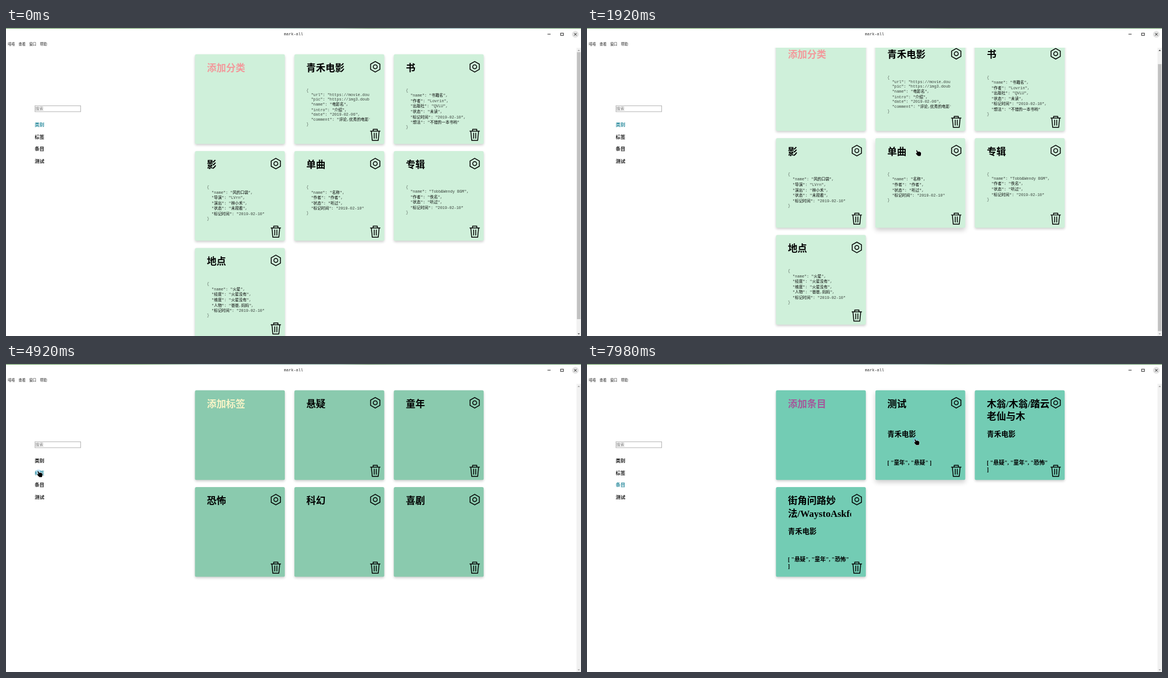
An HTML page for the animation above (8 s loop, 1021 by 548 pixels).

```html
<!DOCTYPE html>
<html lang="zh-CN">
<head>
<meta charset="utf-8">
<title>mark-all</title>
<style>
html, body { margin: 0; width: 100%; height: 100%; overflow: hidden; background: #fff; }
#pane { position: absolute; left: 0; top: 35.4px; width: 1012px; height: 512.6px; overflow: hidden; }
#page { position: absolute; left: 0; top: -35.4px; width: 1920px; height: 1200px; transform-origin: 0 0; }
.card { position: absolute; width: 300px; height: 300px; border-radius: 5px; }
.card > svg { position: absolute; left: 0; top: 0; }
#ui { position: absolute; left: 0; top: 0; }
text { font-family: "Liberation Serif", "Noto Sans CJK SC", "Noto Sans CJK", serif; }
.b { font-weight: bold; }
.m { font-family: "Liberation Mono", "Noto Sans CJK SC", "Noto Sans CJK", monospace; }
.s { font-family: "Noto Sans CJK SC", "Noto Sans CJK", sans-serif; }
</style>
</head>
<body>
<div id="pane"><div id="page"></div></div>
<svg id="ui" width="1021" height="548" viewBox="0 0 1021 548">
  <defs>
    <linearGradient id="sky">
      <stop offset="0" stop-color="#56914c"/><stop offset=".23" stop-color="#629a58"/>
      <stop offset=".34" stop-color="#8fada8"/><stop offset=".58" stop-color="#6f9788"/>
      <stop offset=".63" stop-color="#47784a"/><stop offset=".78" stop-color="#6a9498"/>
      <stop offset="1" stop-color="#568f50"/>
    </linearGradient>
  </defs>
  <rect width="1021" height="1" fill="url(#sky)"/>
  <g fill="none" stroke="#222">
    <path d="M961.5 11h5.5"/>
    <rect x="984.8" y="9.2" width="5" height="4"/>
    <circle cx="1011" cy="11.3" r="6" fill="#e3e3e3" stroke="none"/>
    <path d="M1008.8 9.1l4.4 4.4m0-4.4l-4.4 4.4"/>
  </g>
  <rect x="51.4" y="138.3" width="81.2" height="10.6" fill="#fff" stroke="#aaa" stroke-width=".9"/>
  <rect x="1013" y="35.4" width="8" height="513" fill="#f1f1f1"/>
  <rect id="thumb" x="1013.8" width="6.4" height="475" fill="#c1c1c1"/>
  <path id="up" d="M1014.9 41l2.1-2.4 2.1 2.4z"/>
  <path id="down" d="M1014.9 543.2l2.1 2.4 2.1-2.4z"/>
  <g id="labels"></g>
  <circle id="click" r="5" fill="#5bb8e8"/>
  <g id="cursor" stroke="#fff" stroke-width="1" stroke-linejoin="round">
    <path id="hand" paint-order="stroke" d="M-.5 0L1.5 3.3 3.1 2.8 4.700 3.200 6.300 3.900 7.200 5.600 7 8.400 6.100 10.800H1.900L-.5 8.400-2.100 6.200-1.100 5.200.3 5.800-1.500 1z"/>
    <path id="arrow" paint-order="stroke" d="M0 0V9.2L2 7.6 3.3 10.4 4.8 9.7 3.5 7 6 6.6z"/>
  </g>
</svg>
<script>
const K = 1021 / 1920, LOOP = 8000;
const NS = 'http://www.w3.org/2000/svg';
const $ = id => document.getElementById(id);

function add(parent, tag, attrs, text) {
  const el = document.createElementNS(NS, tag);
  for (const k in attrs) el.setAttribute(k, attrs[k]);
  if (text) el.textContent = text;
  parent.appendChild(el);
  return el;
}
const write = (parent, x, y, size, cls, str, fill = '#000') =>
  add(parent, 'text', { x, y, 'font-size': size, class: cls, fill }, str);

// Card content: title lines, then either record fields or an entry's category and tags.
const FILM = '青禾电影';
const views = [
  { color: '#cff0da', accent: '#f29a9c', cards: [
    { title: ['添加分类'] },
    { title: [FILM], code: 'url=https://movie.dou|pic=https://img3.doub|name=电影名|intro=介绍|date=2019-02-06|comment=评论,优秀的电影' },
    { title: ['书'], code: 'name=书籍名|作者=Lovrin|出版社=QVLU|状态=未读|标记时间=2019-02-10|想法=不错的一本书哟' },
    { title: ['影'], code: 'name=风的口袋|导演=LVrn|演出=林小禾|状态=未观看|标记时间=2019-02-10' },
    { title: ['单曲'], code: 'name=名称|作者=作者|状态=听过|标记时间=2019-02-10' },
    { title: ['专辑'], code: 'name=Tobb&Wendy BGM|作者=佚名|状态=听过|标记时间=2019-02-10' },
    { title: ['地点'], code: 'name=火星|经度=火星没有|维度=火星没有|人物=爸爸,妈妈|标记时间=2019-02-10' }
  ] },
  { color: '#8acaae', accent: '#faf5c8', cards:
    ['添加标签', '悬疑', '童年', '恐怖', '科幻', '喜剧'].map(s => ({ title: [s] })) },
  { color: '#73ccb4', accent: '#a4589a', cards: [
    { title: ['添加条目'] },
    { title: ['测试'], kind: FILM, tags: ['[ "童年", "悬疑" ]'] },
    { title: ['木翁/木翁/踏云', '老仙与木'], kind: FILM, tags: ['[ "悬疑", "童年", "恐怖"', ']'] },
    { title: ['街角问路妙', '法/WaystoAskfor'], kind: FILM, tags: ['[ "悬疑", "童年", "恐怖"', ']'] }
  ] }
];

const CJK = /[\u4e00-\u9fff]/;

function drawCode(box, code) {
  const rows = code.split('|').map((s, i, all) => {
    const [k, v] = s.split('=');
    return `"${k}": "${v}"${i < all.length - 1 ? ',' : ''}`;
  });
  let y = 124, descent = 0;
  ['{', ...rows, '}'].forEach((s, i) => {
    if (i) y += descent + (CJK.test(s) ? 14 : 11);
    descent = 4;
    const brace = s.length === 1;
    const line = write(box, brace ? 0 : 15.6, y, 13, 'm', '');
    // Thin Latin strokes look paler than the Chinese ones.
    s.split(/([\u4e00-\u9fff]+)/).filter(Boolean).forEach(part =>
      add(line, 'tspan', { fill: CJK.test(part) ? '#000' : '#000', 'fill-opacity': CJK.test(part) ? 1 : brace ? .55 : .72 }, part));
  });
}

function drawIcons(svg) {
  const g = add(svg, 'g', { fill: 'none', stroke: '#000', 'stroke-width': 2.8, 'stroke-linejoin': 'round', 'stroke-linecap': 'round' });
  add(g, 'path', { d: 'M270 24l15.5 8.8v17.8L270 59.4l-15.5-8.8V32.8z' });
  add(g, 'circle', { cx: 270, cy: 41.7, r: 6.6 });
  add(g, 'path', { d: 'M254 257h32M263 256v-5h14v5M257 257l3 31h20l3-31M266.5 263.5v17.5M273.5 263.5v17.5' });
}

views.forEach(view => {
  view.layer = document.createElement('div');
  $('page').appendChild(view.layer);
  view.cards.forEach((card, i) => {
    card.x = 631 + i % 3 * 332;
    card.y = 88 + Math.floor(i / 3) * 324.2;
    const el = card.el = document.createElement('div');
    el.className = 'card';
    el.style.cssText = `left:${card.x}px;top:${card.y}px;background:${view.color}`;
    const svg = add(el, 'svg', { width: 300, height: 300 });
    const box = add(svg, 'svg', { x: 40, width: 211, height: 300 });
    card.title.forEach((s, n) => write(box, 0, 56 + n * 43, 32, 'b', s, i ? '#000' : view.accent));
    if (card.code) drawCode(box, card.code);
    if (card.kind) write(box, 0, 155, 24, 'b', card.kind);
    (card.tags || []).forEach((s, n) => write(box, 0, 248 + n * 23, 18.72, 'b', s));
    if (i) drawIcons(svg);
    view.layer.appendChild(el);
  });
});

const labels = $('labels');
write(labels, 510.5, 13.4, 7.1, 'm', 'mark-all', '#333').setAttribute('text-anchor', 'middle');
['嘻嘻', '查看', '窗口', '帮助'].forEach((s, i) => write(labels, 3.2 + i * 19, 31.4, 12 * K, 's', s, '#222'));
write(labels, 52, 146.2, 13.8 * K, 's', '搜索', '#777');
const tabs = ['类别', '标签', '条目', '测试'].map((s, i) =>
  write(labels, 51, 174.6 + i * 21.9, 16 * K, 's b', s));

// [time, x, y] of the pointer tip; [time, offset] of the scroll.
const path = [
  [510, 600, -14], [930, 585.5, 155.5], [1350, 585.5, 155.5], [1670, 586, 217], [2240, 586, 217],
  [2530, 358, 166], [2690, 358, 166], [2990, 377, 285], [3210, 377, 285], [3250, 377, 286],
  [3420, 377, 286], [3540, 283, 285], [3600, 265, 284], [3750, 160, 258], [4000, 75, 207],
  [4180, 57.5, 190.5], [5440, 57.5, 190.5], [5650, 250, 165], [5850, 480, 150], [6190, 768, 159],
  [6250, 768, 159], [6350, 775, 185], [6500, 700, 268], [6620, 560, 282], [6750, 400, 262],
  [6860, 440, 215], [7010, 576, 160], [7080, 576, 160], [7140, 579.5, 149.5], [7600, 579.5, 149.5],
  [7720, 583, 133.5]
];
const scrolls = [[940, 0], [990, 4], [1050, 4], [1130, 20], [1220, 37], [1310, 43.5],
  [2000, 43.5], [2080, 36], [2180, 14], [2300, 0]];
const clicks = [[4870, 5180], [7920, 8200]];

function at(keys, t) {
  if (t <= keys[0][0]) return keys[0].slice(1);
  for (let i = 1; i < keys.length; i++) {
    const a = keys[i - 1], b = keys[i];
    if (t < b[0]) {
      const f = (t - a[0]) / (b[0] - a[0]);
      return a.slice(1).map((v, n) => v + (b[n + 1] - v) * f);
    }
  }
  return keys[keys.length - 1].slice(1);
}

const viewAt = t => t < 4870 ? 0 : t < 7920 ? 1 : 2;

function over(card, t) {
  const [x, y] = at(path, t), [s] = at(scrolls, t);
  const dx = x / K - card.x, dy = y / K + s - card.y;
  return y > 36 && dx > 0 && dx < 300 && dy > 0 && dy < 300;
}

// Hover fades as the share of the last 300 ms spent over the card.
function hover(card, t) {
  let n = 0;
  for (let i = 0; i < 15; i++) if (over(card, t - i * 20)) n++;
  return n / 15;
}

function draw(t) {
  const now = viewAt(t), [scroll] = at(scrolls, t), [x, y] = at(path, t);
  $('page').style.transform = `scale(${K}) translateY(${-scroll}px)`;
  views.forEach((v, i) => v.layer.style.display = i === now ? '' : 'none');
  views[now].cards.forEach(card => {
    const h = hover(card, t);
    card.el.style.boxShadow = `0 ${4 + 4 * h}px ${8 + 8 * h}px rgba(0,0,0,.2)`;
  });
  tabs.forEach((el, i) => el.setAttribute('fill', i === now ? '#2c8c9e' : '#1c1c1c'));

  $('thumb').style.display = now ? 'none' : '';
  $('thumb').setAttribute('y', 43 + scroll * K * .92);
  $('up').setAttribute('fill', now || !scroll ? '#a3a3a3' : '#505050');
  $('down').setAttribute('fill', now || scroll > 43 ? '#a3a3a3' : '#505050');

  const onTab = x > 50 && x < 70 && y > 165 && y < 245;
  const hand = onTab || views[now].cards.some(c => over(c, t));
  $('hand').style.display = hand ? '' : 'none';
  $('arrow').style.display = hand ? 'none' : '';
  $('cursor').style.display = t < 510 ? 'none' : '';
  $('cursor').setAttribute('transform', `translate(${x} ${y})`);

  const hit = clicks.find(c => t >= c[0] && t < c[1]);
  $('click').setAttribute('cx', x);
  $('click').setAttribute('cy', y + 2);
  $('click').setAttribute('opacity', hit ? .4 * (1 - (t - hit[0]) / (hit[1] - hit[0])) : 0);
}

const start = performance.now();
(function tick() {
  draw((performance.now() - start) % LOOP);
  requestAnimationFrame(tick);
})();
</script>
</body>
</html>
```
